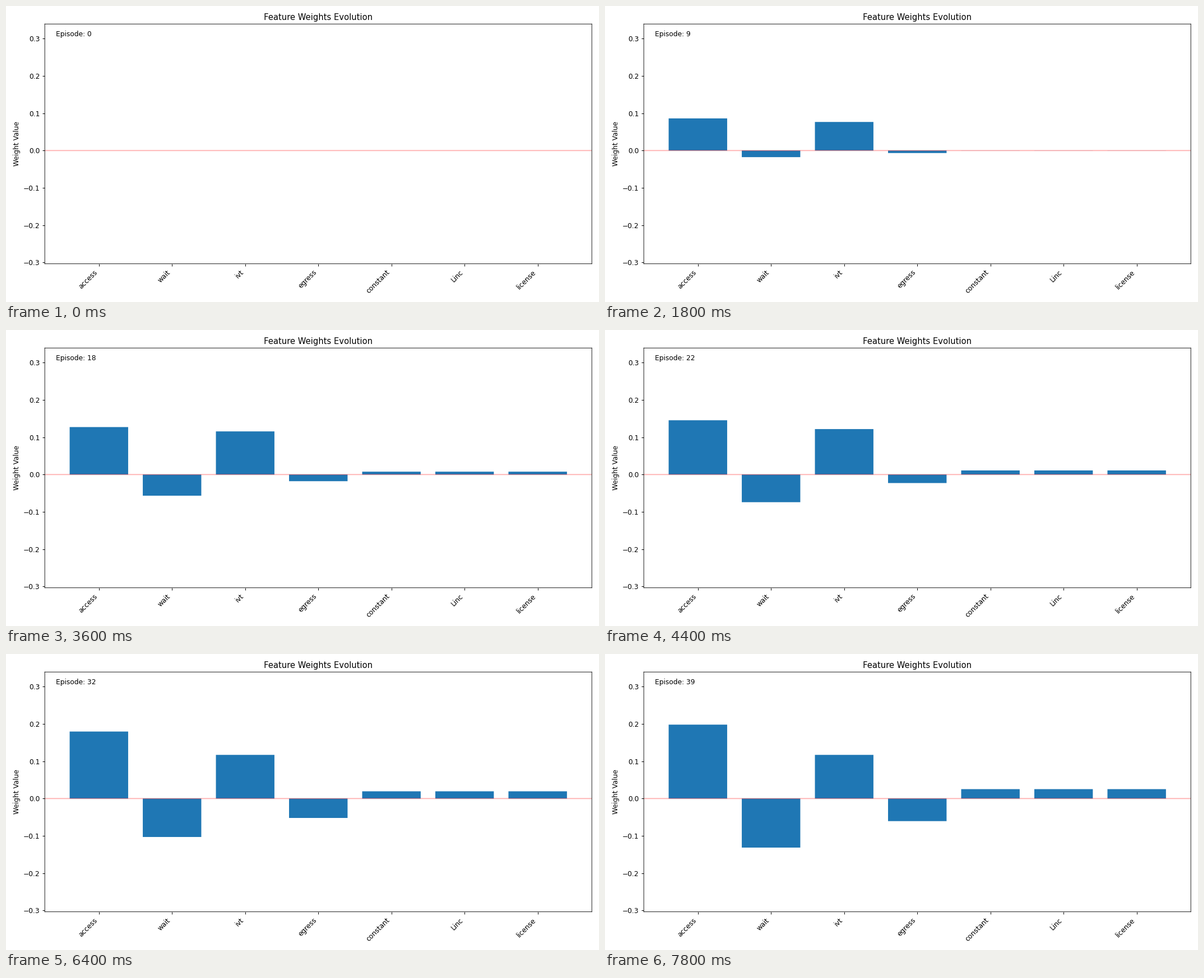
Animation of 1058 by 529 pixels, one loop 8 s. Source, as a matplotlib script:

```python
import matplotlib.pyplot as plt
import numpy as np
from matplotlib.animation import FuncAnimation

WIDTH, HEIGHT = 1058, 529
EPISODES = 40
STEP_MS = 200

# Turning points (episode, weight); weights start at 0 and drift linearly.
BIAS = [(4, -0.004), (39, 0.0252)]
CURVES = {
    "access": [(7, 0.077), (26, 0.1637), (39, 0.198)],
    "wait": [(4, 0.004), (26, -0.0914), (32, -0.103), (39, -0.1314)],
    "ivt": [(4, 0.065), (9, 0.0766), (18, 0.1156), (26, 0.128), (32, 0.117)],
    "egress": [(4, 0.008), (9, -0.0067), (26, -0.0277), (32, -0.052),
               (39, -0.0605)],
    "constant": BIAS,
    "Linc": BIAS,
    "license": BIAS,
}


def weight(points, episode):
    times, values = zip((0, 0), *points)
    return np.interp(episode, times, values)


plt.rcParams["path.snap"] = False
plt.rcParams["axes.linewidth"] = 0.72

fig, ax = plt.subplots(figsize=(12, 6), dpi=88.16667)
fig.subplots_adjust(left=69.2 / WIDTH, right=1045.2 / WIDTH,
                    bottom=1 - 460.7 / HEIGHT, top=1 - 32.2 / HEIGHT)

slots = np.arange(len(CURVES))
bars = ax.bar(slots, 0 * slots, color="#1f77b4")
ax.axhline(0, color="r", alpha=0.3)
ax.set_xlim(-0.74, 6.74)
ax.set_ylim(-0.3034, 0.339)
ax.set_xticks(slots, CURVES, rotation=45, ha="right")
ax.set_yticks(np.arange(-3, 4) / 10)
ax.set_ylabel("Weight Value")
ax.set_title("Feature Weights Evolution")
label = ax.text(0.02, 0.95, "", transform=ax.transAxes)


def update(episode):
    for bar, points in zip(bars, CURVES.values()):
        bar.set_height(weight(points, episode))
    label.set_text(f"Episode: {episode}")
    return [*bars, label]


anim = FuncAnimation(fig, update, frames=EPISODES, interval=STEP_MS,
                     init_func=lambda: update(0), repeat=True,
                     repeat_delay=0, blit=False)
plt.show()
```
